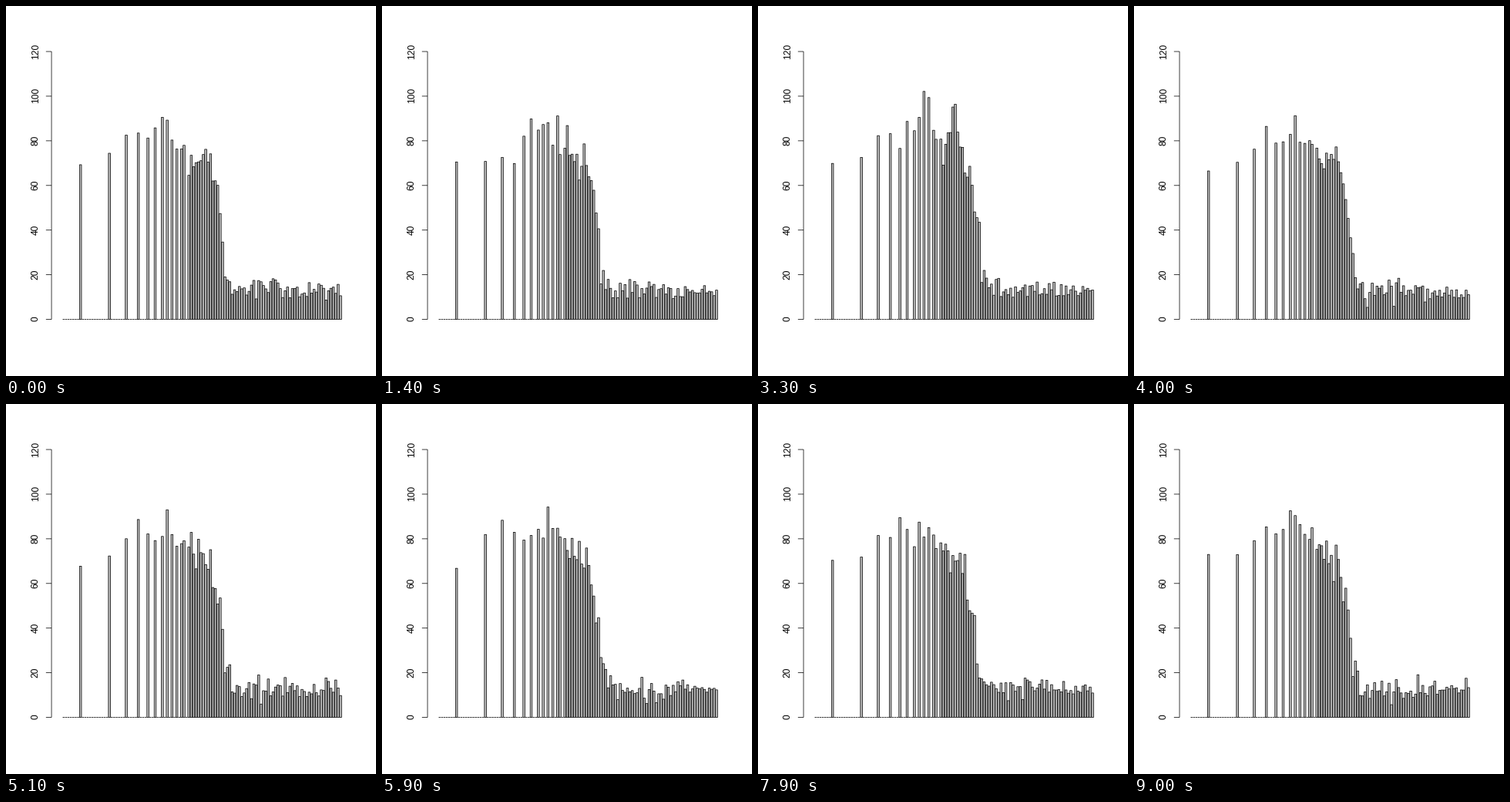
These frames come from a looping animation (480 px wide and 480 px high, 9.1 s). A matplotlib script:

```python
import matplotlib.pyplot as plt
import numpy as np
from matplotlib.animation import FuncAnimation
from matplotlib.collections import LineCollection, PolyCollection

SIZE, DPI = 480, 80
PX = 72 / DPI
LINE = 0.75 * PX
FRAMES, INTERVAL = 91, 100

# Plot box and bar layout in pixels
LEFT, TOP, BOTTOM = 59.04, 59.04, 406.56
N_BARS = 116
X0, SPAN = 73.511, 361.778
PITCH = SPAN / (N_BARS - 1 / 6)
WIDTH = PITCH / 1.2
UNIT = (BOTTOM - TOP) / 120

# Low notes are too coarse to fill every slot
SPARSE = [7, 19, 26, 31, 35, 38, 41, 43, 45, 47, 49, 50]
BARS = np.array(SPARSE + list(range(52, N_BARS)))
EMPTY = np.setdiff1d(np.arange(52), SPARSE)

# Typical level and flutter along the bars
LEVEL_AT = [7, 19, 31, 43, 47, 52, 60, 62, 64, 66, 67, 69, 72, 115]
LEVEL = [69, 75, 83, 85, 82, 75, 71, 65, 56, 38, 23, 16, 13, 12.7]
FLUTTER_AT = [7, 20, 66, 72, 115]
FLUTTER = [2.2, 4.5, 4.5, 3.3, 1.6]
SWELLS = [26, 34, 56, 63]


def bell(x, mid, width):
    return np.exp(-((x - mid) / width) ** 2)


def heights(n):
    rng = np.random.default_rng(n)
    swell = sum(bell(n, mid, 1.8) for mid in SWELLS)
    # A swell lifts two humps and pushes the cutoff to the right
    shift = 2.5 * swell * (BARS > 60)
    h = np.interp(BARS - shift, LEVEL_AT, LEVEL)
    h += swell * (22 * bell(BARS, 47, 3) + 31 * bell(BARS, 57.5, 2.5))
    h += np.interp(BARS, FLUTTER_AT, FLUTTER) * rng.normal(size=len(BARS))
    return np.clip(h, 3.5, 113)


def y_of(value):
    return BOTTOM - UNIT * value


def bar_shapes(n):
    left = X0 + PITCH * BARS
    return [[(x, BOTTOM), (x, y), (x + WIDTH, y), (x + WIDTH, BOTTOM)]
            for x, y in zip(left, y_of(heights(n)))]


fig = plt.figure(figsize=(SIZE / DPI, SIZE / DPI), dpi=DPI, facecolor="white")
ax = fig.add_axes([0, 0, 1, 1])
ax.set(xlim=(0, SIZE), ylim=(SIZE, 0))
ax.axis("off")

lines = [[(LEFT, TOP), (LEFT, BOTTOM)]]
for value in range(0, 121, 20):
    y = y_of(value)
    lines.append([(LEFT - 7.2, y), (LEFT, y)])
    ax.text(41.76, y - 0.6, str(value), rotation=90, rotation_mode="anchor",
            ha="center", va="baseline", family="Liberation Sans", size=12 * PX)
for x in X0 + PITCH * EMPTY:
    lines.append([(x, BOTTOM), (x + WIDTH, BOTTOM)])
ax.add_collection(LineCollection(lines, colors="black", linewidths=LINE,
                                 capstyle="butt", snap=False))

bars = PolyCollection(bar_shapes(0), facecolors="#bebebe", edgecolors="black",
                      linewidths=LINE, joinstyle="round", snap=False)
ax.add_collection(bars)


def update(n):
    bars.set_verts(bar_shapes(n))
    return [bars]


anim = FuncAnimation(fig, update, frames=FRAMES, interval=INTERVAL, repeat=True)
plt.show()
```
